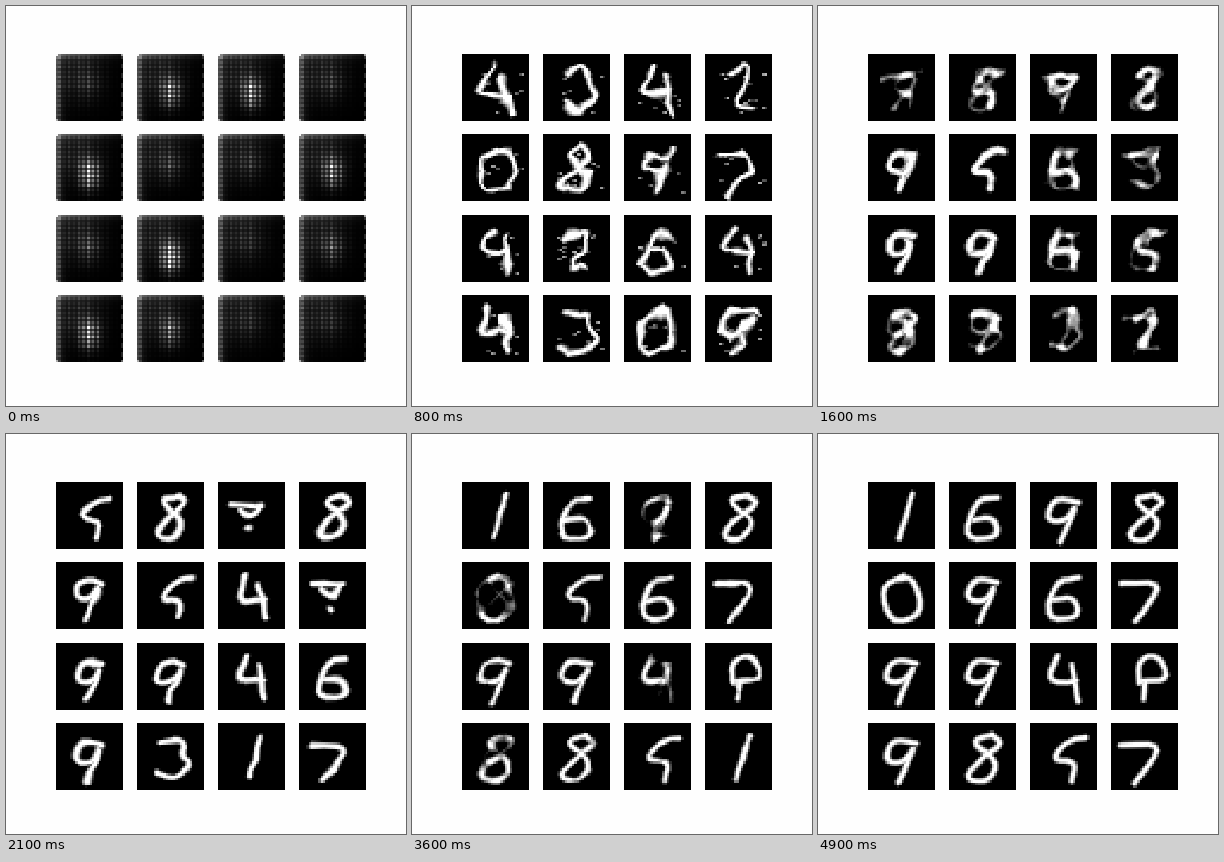
Recreate the animation shown at these times as an HTML page with a canvas. Size 400 px wide and 400 px high, loop 5 s.

```html
<!DOCTYPE html>
<html>
<head>
<meta charset="utf-8">
<style>
html, body { margin: 0; width: 100%; height: 100%; overflow: hidden; background: #fefefe; }
canvas { display: block; }
</style>
</head>
<body>
<canvas id="stage" width="400" height="400"></canvas>
<script>
const N = 28, SIZE = 67, STEP = 100, STEPS = 50, FAR = 2.8;

// Control points of each digit inside a tile; corners are rounded later
const glyphs = {
  0: "36 14 12 26 22 62 56 52 46 16 30 18",
  1: "45 12 40 26 31 56",
  2: "24 20 44 8 44 28 28 46 32 56 46 53",
  3: "22 18 50 12 44 32 56 44 36 58 20 52",
  4: "28 12 16 40 46 38/42 22 48 58",
  5: "56 15 38 17 20 37 46 38 42 58",
  6: "48 16 26 18 14 58 50 56 44 34 24 38",
  7: "10 22 54 20 24 60",
  8: "44 12 20 18 50 38 38 60 14 56 34 34 54 20 42 12",
  9: "48 20 24 16 16 38 36 40 48 20 30 60",
  P: "28 40 26 18 46 10 60 36 28 38/34 38 32 56",
  T: "10 22 44 22/22 28 32 36 40 26/30 48"
};

// Stages of training: which digit each tile shows, and how rough it still is
const stages = [
  { n: 8, digits: "4342 0897 4264 4309", width: 1.2, scale: .95, rough: 5 },
  { n: 12, digits: "7592 9563 9965 8932", width: 1.45, scale: .88, rough: 3.2 },
  { n: 21, digits: "58T8 954T 9946 9317", width: 1.25, scale: .9, rough: 2 },
  { n: 30, digits: "1628 8567 999P 6851", width: 1.1, scale: .97, rough: 1.5 },
  { n: 41, digits: "1698 0567 994P 8851", width: 1.05, scale: 1, rough: 1.2 },
  { n: 49, digits: "1698 0967 994P 9857", width: 1.15, scale: 1, rough: .7 }
];
// Brightness of the spot in the opening lattice, tile by tile
const glow = [.35, .8, .85, .35, .9, .45, .35, .8, .5, 1, .25, .55, .85, .7, .25, .25];

const ctx = document.getElementById("stage").getContext("2d");
ctx.imageSmoothingEnabled = false;
const tile = document.createElement("canvas");
tile.width = tile.height = N;
const tileCtx = tile.getContext("2d");
const img = tileCtx.createImageData(N, N);

const clamp = v => Math.max(0, Math.min(1, v));
const mix = (a, b, k) => a + (b - a) * k;
const hash = (x, y, s) => {
  const v = Math.sin(x * 12.99 + y * 78.23 + s * 37.72) * 43758.55;
  return v - Math.floor(v);
};
function noise(x, y, s) {
  const i = Math.floor(x), j = Math.floor(y), u = x - i, v = y - j;
  return mix(mix(hash(i, j, s), hash(i + 1, j, s), u),
             mix(hash(i, j + 1, s), hash(i + 1, j + 1, s), u), v) - .5;
}

// Corner cutting that keeps both ends
function round(pts) {
  const out = [pts[0]];
  for (let i = 1; i < pts.length; i++) {
    const [a, b] = [pts[i - 1], pts[i]];
    for (const k of [.25, .75]) out.push([mix(a[0], b[0], k), mix(a[1], b[1], k)]);
  }
  return [...out, pts[pts.length - 1]];
}

function segments(path, scale) {
  const segs = [];
  for (const stroke of path.split("/")) {
    const v = stroke.split(" ").map(s => ((s - SIZE / 2) * scale + SIZE / 2) * N / SIZE - .5);
    let pts = [];
    for (let i = 0; i < v.length; i += 2) pts.push([v[i], v[i + 1]]);
    if (pts.length > 2) pts = round(round(pts));
    pts.forEach((p, i) => segs.push([...pts[Math.max(0, i - 1)], ...p]));
  }
  return segs;
}

// Distance of every pixel to the strokes, seen through a seeded warp
function field(segs, rough, seed) {
  return Float32Array.from({ length: N * N }, (_, i) => {
    const px = i % N, py = i / N | 0;
    const x = px + rough * noise(px / 5, py / 5, seed);
    const y = py + rough * noise(px / 5, py / 5, seed + 500);
    let d = FAR;
    for (const [ax, ay, bx, by] of segs) {
      const dx = bx - ax, dy = by - ay;
      const t = clamp(((x - ax) * dx + (y - ay) * dy) / (dx * dx + dy * dy || 1));
      d = Math.min(d, Math.hypot(x - ax - t * dx, y - ay - t * dy));
    }
    return d;
  });
}

for (const s of stages) {
  s.fields = [...s.digits.replace(/ /g, "")].map((g, id) =>
    field(segments(glyphs[g], s.scale), s.rough, id * 17 + s.n));
}

// Opening picture: a dotted lattice with a spot and a grey top left edge
function lattice(x, y, g) {
  const dots = [.25, 1, .35, .65][x % 4] * [.4, 1, .3, .75][y % 4];
  const spot = Math.exp(-(((x - 13.5) / 4) ** 2) - ((y - 9 - 8 * g) / 6) ** 2);
  const haze = .22 * Math.exp(-((x - 9) ** 2) / 90 - (y - 8) ** 2 / 110);
  const edge = (.4 * Math.exp(-x / 1.4) * (.5 + dots) + .32 * Math.exp(-y / 1.3)) * (1 - x / 36);
  const corner = x % (N - 1) == 0 && y % (N - 1) == 0 ? .4 : 0;
  const rim = x == N - 1 && y % 4 < 2 ? .15 : 0;
  return edge + corner + rim + haze * (.25 + dots) + 1.5 * g * g * spot * dots;
}

function paint(id, n) {
  let j = 0;
  while (stages[j + 1] && stages[j + 1].n <= n) j++;
  const a = stages[j], b = stages[j + 1] || a;
  const k = a == b ? 0 : clamp((n - a.n) / (b.n - a.n));
  const fade = Math.min(1, n / 3);
  const early = clamp((13 - n) / 5);
  const wobble = 3.2 * k * (1 - k) + 2 * clamp(1 - n / 8) + .8 * early;
  for (let i = 0; i < N * N; i++) {
    const x = i % N, y = i / N | 0;
    const d = mix(a.fields[id][i], b.fields[id][i], k)
      + wobble * noise(x / 2.5, y / 2.5, n + id * 61);
    let v = clamp((mix(a.width, b.width, k) - d) / 1.3 + .5);
    if (x > 5 && x < 26 && y > 7 && y < 25 && hash(x >> 1, y, n + id * 7) > 1 - .06 * early)
      v = Math.max(v, .15 + .6 * hash(x, y, id));
    if (fade < 1) v = mix(lattice(x, y, glow[id]), v, fade);
    img.data.fill(255 * clamp(v), i * 4, i * 4 + 3);
    img.data[i * 4 + 3] = 255;
  }
  tileCtx.putImageData(img, 0, 0);
  ctx.drawImage(tile, Math.round(50 + 80.9 * (id % 4)), Math.round(48 + 80.4 * (id >> 2)), SIZE, SIZE);
}

let shown = -1;
const start = performance.now();
function frame() {
  const n = Math.floor((performance.now() - start) / STEP) % STEPS;
  if (n != shown) glow.forEach((_, id) => paint(id, n));
  shown = n;
  requestAnimationFrame(frame);
}
frame();
</script>
</body>
</html>
```
